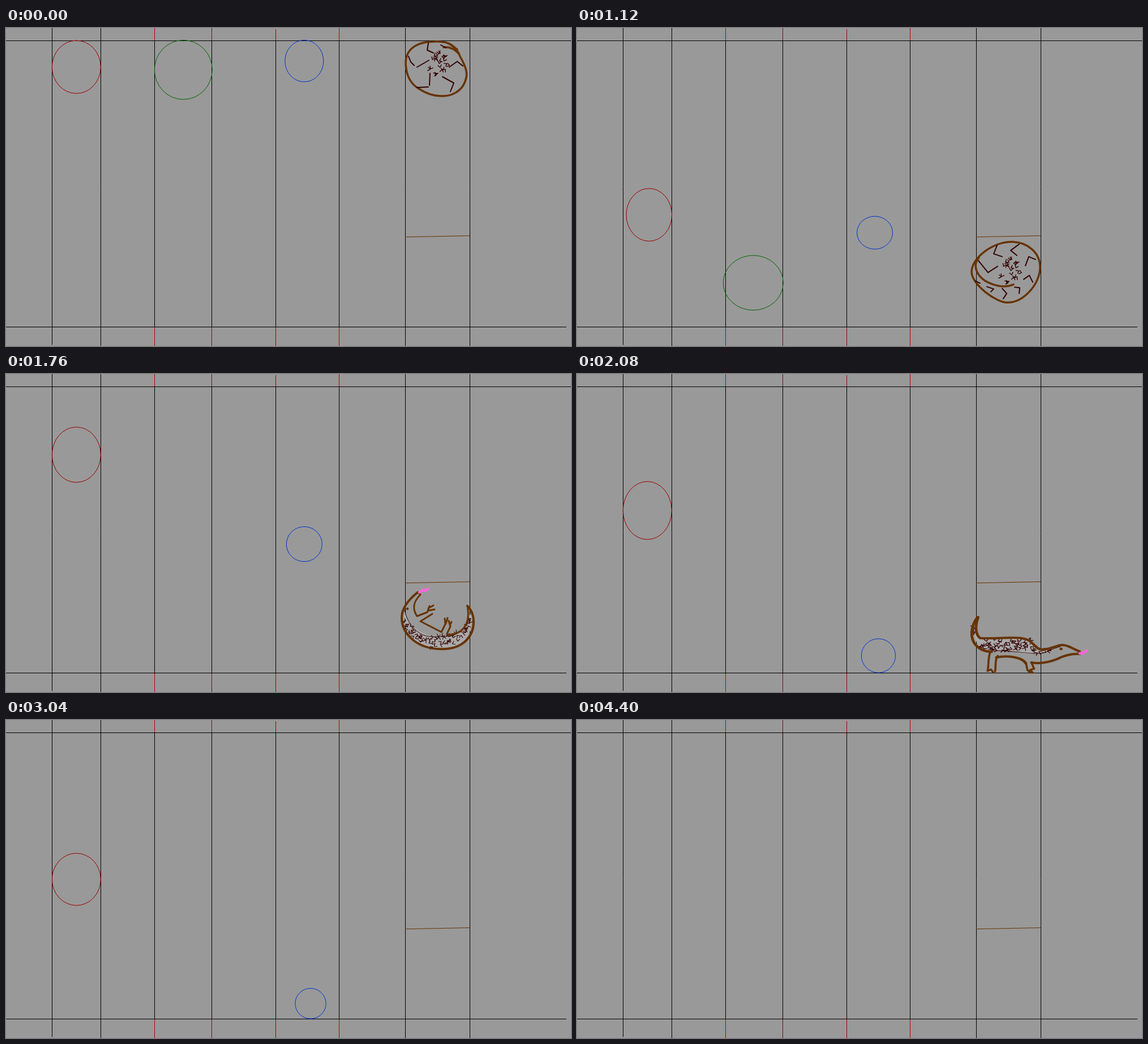
An HTML page with a canvas that plays this animation: 998 px wide and 561 px high, repeating every 4800 ms.

```html
<!DOCTYPE html>
<html lang="en">
<head>
<meta charset="utf-8">
<title>Bouncing balls</title>
<style>
html, body { margin: 0; width: 100%; height: 100%; overflow: hidden; background: #999; }
canvas { display: block; }
</style>
</head>
<body>
<canvas id="stage" width="998" height="561"></canvas>
<script>
const ctx = document.getElementById('stage').getContext('2d');
const FLOOR = 527, BROWN = '#663300', DARK = '#330000';

// bounces: [time of peak, ms rising, ms falling, height]; shape: [time, centre x, rx, ry]
const balls = [
  { color: '#990000', power: 2, until: 4400,
    bounces: [[0, 1, 837, 411.5], [1680, 751, 720, 340], [3080, 540, 570, 201], [4010, 270, 270, 42], [4440, 80, 80, 3]],
    shape: [[0, 124, 43, 46.7], [640, 126.5, 40.5, 45.2], [1120, 127, 40.3, 46.5], [1760, 124, 43, 48.8],
            [2400, 124, 43, 53.5], [3040, 124, 43, 46], [4400, 124, 43, 45]] },
  { color: '#006600', power: 2, until: 1600,
    bounces: [[0, 1, 675, 401], [990, 230, 215, 46], [1415, 120, 120, 14]],
    shape: [[0, 313, 51, 52.3], [640, 313, 51, 55.5], [1120, 311, 53, 48.3], [1600, 311, 53, 48]] },
  { color: '#0033cc', power: 2.3, until: 4400,
    bounces: [[0, 1, 925, 432], [1488, 503, 484, 267], [2560, 480, 480, 206], [3500, 310, 310, 150], [4160, 285, 285, 82]],
    shape: [[0, 526.5, 34, 36.8], [640, 525.7, 33.5, 33.2], [1120, 525.7, 31.5, 29], [1760, 526.5, 31.5, 30.8],
            [2400, 537.7, 28.7, 29.2], [3040, 537.7, 27.2, 26.8], [4400, 537.7, 23.5, 23.5]] }
];
const animalBounces = [[0, 1, 612, 406], [1040, 330, 220, 48], [1700, 360, 260, 42]];

function bounce(list, t, power) {
  let end = 0, last = list[0][3];
  for (const [peak, up, down, high] of list) {
    const start = peak - up;
    if (t < start) {
      const hit = Math.sin(Math.PI * (t - end) / (start - end));
      return { h: 0, squash: hit * (last / list[0][3]) ** 0.25 };
    }
    end = peak + down;
    last = high;
    if (t <= end) {
      const u = Math.abs(t - peak) / (t < peak ? up : down);
      return { h: high * (1 - u ** power), squash: 0 };
    }
  }
  return { h: 0, squash: 0 };
}

function shapeAt(keys, t) {
  let i = 1;
  while (i < keys.length - 1 && t > keys[i][0]) i++;
  const a = keys[i - 1], b = keys[i], u = (t - a[0]) / (b[0] - a[0]);
  return a.map((v, k) => v + (b[k] - v) * u);
}

function drawBall(ball, t) {
  if (t >= ball.until) return;
  const { h, squash } = bounce(ball.bounces, t, ball.power);
  let [, x, rx, ry] = shapeAt(ball.shape, t);
  rx *= 1 + 0.24 * squash;
  ry *= 1 - 0.22 * squash;
  ctx.beginPath();
  ctx.ellipse(x + 0.3, FLOOR - h - ry, rx, ry, 0, 0, 7);
  ctx.strokeStyle = ball.color;
  ctx.lineWidth = 1;
  ctx.stroke();
}

function line(x1, y1, x2, y2, color = '#000') {
  ctx.beginPath();
  ctx.moveTo(x1, y1);
  ctx.lineTo(x2, y2);
  ctx.strokeStyle = color;
  ctx.lineWidth = 1;
  ctx.stroke();
}

function drawGuides() {
  for (const x of [81, 167, 705, 819]) line(x + 0.5, 0, x + 0.5, x === 81 ? 559 : 561);
  for (const [x, color] of [[262, '#b80000'], [363, '#5a1a1a'], [476, '#a00000'], [588, '#b80000']]) {
    line(x + 0.5, x === 476 ? 2 : 0, x + 0.5, 561, color);
    line(x + 0.5, 22, x + 0.5, FLOOR);
  }
  line(0, 22.5, 998, 22.5);
  line(0, 527.5, 990, 527.5);
  line(705, 368.7, 819, 366.5, BROWN);
}

// Small V-shaped scales; place(u, v) maps the unit square onto the body
function scales(count, size, place) {
  const path = new Path2D();
  let seed = 11;
  const rnd = () => (seed = seed * 16807 % 2147483647) / 2147483647;
  for (let i = 0; i < count; i++) {
    const [x, y] = place((i + rnd()) / count, rnd()), a = rnd() * 6.3;
    path.moveTo(x + size * Math.cos(a), y + size * Math.sin(a));
    path.lineTo(x, y);
    path.lineTo(x + size * Math.cos(a + 1.3), y + size * Math.sin(a + 1.3));
  }
  return path;
}

const cluster = (x, y, rx, ry) => scales(25, 5, (u, v) => {
  const a = u * 44, r = Math.sqrt(v);
  return [x + rx * r * Math.cos(a), y + ry * r * Math.sin(a)];
});
const P = d => new Path2D(d);

const rolled = [
  { from: 0, time: 0, x: 760, y: 72, base: 121, scales: cluster(766, 63, 19, 21),
    body: P('M706,64C705,40 722,24 757,24C785,22 797,36 802,50C812,68 815,78 813,87C808,113 785,121 768,120C752,120 738,113 729,107C712,97 707,80 706,64ZM773,34C783,33 792,36 801,47M782,27L797,38'),
    limbs: P('M711,50L715,60L721,66M726,69L747,57M746,27L744,39L755,44M749,80L748,101M726,105L746,104M771,86L791,97L785,112M783,69L797,59L807,67M768,30L777,35') },
  { from: 320, time: 640, x: 762, y: 478, base: 527, scales: cluster(757, 477, 28, 17),
    body: P('M727,447C706,458 701,478 709,494C720,515 745,525 763,525C795,525 818,505 818,476C818,448 796,431 773,431C745,431 733,447 722,471'),
    limbs: P('M708,469L715,476L720,472M745,443L743,454L754,458M775,435L767,446L776,458M787,469L790,453L811,460M784,489L805,486L806,503M769,500L781,510L773,524M741,494L749,510L734,514M728,483L726,500L715,497') },
  { from: 880, time: 1120, x: 759, y: 430, base: 485, scales: cluster(767, 428, 20, 23),
    body: P('M770,377C795,378 818,395 818,422C818,450 790,484 760,484C740,484 697,452 697,430C697,405 735,376 770,377ZM710,405C697,418 706,443 735,452C750,457 762,456 771,452'),
    limbs: P('M742,383L736,398L751,403M781,381L766,392L777,401M792,419L798,403L810,408M789,443L799,436L805,448M709,410L726,431L743,420M773,457L782,458L781,468M751,459L759,468L753,477M724,456L736,460L731,465M704,446L712,450') }
];

const curled = {
  base: 487, eye: [709, 414],
  hide: P('M703,413C700,455 722,484 770,484C812,484 825,455 823,425L819,425C816,455 795,462 780,462C745,467 708,450 703,413Z'),
  body: P('M727,385C712,397 699,412 699,430C699,455 722,485 770,485C810,485 826,460 826,437C826,425 821,415 815,409'),
  limbs: P('M815,409C819,430 816,459 779,460M727,385L732,389C721,400 716,412 726,427L744,420L748,409M746,413L755,408M747,417L757,415M753,423L732,436L769,455L776,441L775,431M777,440L780,430M779,458L785,445L782,435M784,443L787,437'),
  edge: P('M704,416C710,445 730,462 750,463C765,464 780,463 790,461'),
  tongue: P('M730,385L735,381L740,382L745,379'),
  scales: scales(68, 5, (u, v) => {
    const a = 0.08 + u * 2.9, q = 0.97 - 0.35 * v * Math.sin(a);
    return [762 + 62 * q * Math.cos(a), 427 + 57 * q * Math.sin(a)];
  })
};

const standing = {
  base: FLOOR, eye: [831, 485],
  hide: P('M705,435C697,460 705,487 728,489C755,487 785,497 805,492L830,481L802,487C793,486 790,466 770,465L712,467C704,460 703,447 705,435Z'),
  body: P('M707,429C697,445 697,462 701,472C705,482 715,490 728,490M708,429C703,445 704,460 711,466C740,468 770,461 783,470C792,477 795,486 802,486C815,486 825,478 833,478C845,479 850,487 858,489L859,494C845,493 835,497 825,503C810,510 797,511 787,509M735,500C750,496 774,499 779,511'),
  limbs: P('M726,490C722,504 724,514 722,524L727,521L730,526M737,497C732,506 735,515 733,525M779,510L781,522L785,527M787,509L791,520L785,522L789,527'),
  edge: P('M728,488C760,487 788,496 805,492C815,488 823,482 830,481'),
  tongue: P('M859,493L864,492L869,488'),
  scales: scales(70, 5, (u, v) => u < 0.08 ? [700 + 4 * v, 445 + 250 * u]
    : u > 0.9 ? [790 + 270 * (u - 0.9), 488 + 4 * v]
    : [705 + 95 * u, 470 + 18 * v])
};

function stroke(path, color, width) {
  ctx.strokeStyle = color;
  ctx.lineWidth = width;
  ctx.stroke(path);
}

function drawRolled(pose, t) {
  ctx.translate(pose.x, pose.y);
  ctx.rotate((t - pose.time) * 0.004);
  ctx.translate(-pose.x, -pose.y);
  stroke(pose.body, BROWN, 3.5);
  stroke(pose.limbs, DARK, 2);
  stroke(pose.scales, DARK, 1.4);
}

function drawOpen(pose) {
  ctx.fillStyle = '#aaa';
  ctx.fill(pose.hide);
  stroke(pose.scales, DARK, 1.1);
  stroke(pose.edge, DARK, 1);
  stroke(pose.body, BROWN, 4);
  stroke(pose.limbs, BROWN, 3);
  stroke(pose.tongue, '#ff66dd', 4.5);
  ctx.beginPath();
  ctx.arc(...pose.eye, 2.3, 0, 7);
  ctx.fillStyle = BROWN;
  ctx.fill();
}

function drawAnimal(t) {
  if (t >= 2800) return;
  const pose = t >= 2000 ? standing : t >= 1440 ? curled : rolled.findLast(p => t >= p.from);
  ctx.save();
  ctx.lineCap = ctx.lineJoin = 'round';
  ctx.translate(0, FLOOR - bounce(animalBounces, t, 2).h - pose.base);
  if (pose === standing && t < 2320) {
    ctx.translate(705, 0);
    ctx.scale(1 + 0.27 * Math.sin(Math.PI * (t - 2000) / 320), 1);
    ctx.translate(-705, 0);
  }
  if (t < 1440) drawRolled(pose, t);
  else drawOpen(pose);
  ctx.restore();
}

function frame() {
  const t = Math.min(4400, Math.floor(performance.now() % 4800 / 80) * 80);
  ctx.fillStyle = '#999';
  ctx.fillRect(0, 0, 998, 561);
  drawGuides();
  for (const ball of balls) drawBall(ball, t);
  drawAnimal(t);
  requestAnimationFrame(frame);
}
frame();
</script>
</body>
</html>
```
